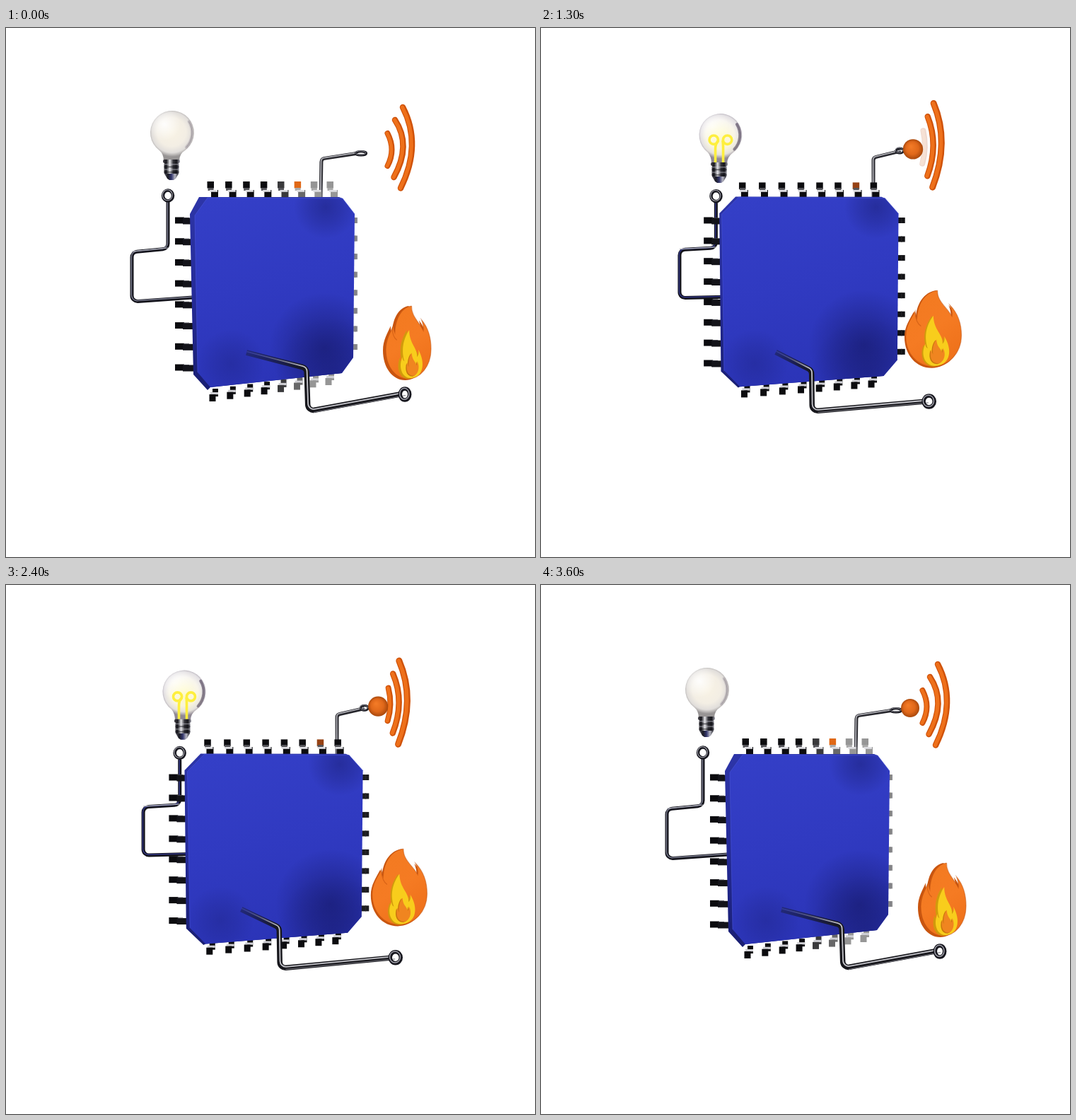
Animation, 748 px wide and 748 px high, one loop 3700 ms. Source, as an HTML page with a canvas:

```html
<!DOCTYPE html>
<html lang="en">
<head>
<meta charset="utf-8">
<title>Connected chip</title>
<style>
  html, body { margin: 0; width: 100%; height: 100%; overflow: hidden; background: #fff; }
  canvas { display: block; width: 748px; height: 748px; }
</style>
</head>
<body>
<canvas id="stage" width="748" height="748"></canvas>
<script>
const ctx = document.getElementById('stage').getContext('2d');
const LOOP = 3700, STEP = 100, HALF = 1800, MID = 0.5, FAR = 0.933;
const clamp = v => Math.max(0, Math.min(1, v));
const mix = (a, b, k) => a + (b - a) * k;
const rgb = (a, b, k) => `rgb(${a.map((v, i) => Math.round(mix(v, b[i], k))).join()})`;

let time = 0, turn = 0, w0 = 1, w1 = 0, w2 = 0;

// Weights for a smooth blend of three poses: start, middle, far turn.
function setTime(ms) {
  time = ms;
  turn = (1 - Math.cos(Math.PI * ms / HALF)) / 2;
  w0 = (turn - MID) * (turn - FAR) / (MID * FAR);
  w1 = turn * (turn - FAR) / (MID * (MID - FAR));
  w2 = turn * (turn - MID) / (FAR * (FAR - MID));
}
const q = (a, b, c) => a * w0 + b * w1 + c * w2;
const at = v => [q(v[0], v[2], v[4]), q(v[1], v[3], v[5])];

function poly(points) {
  ctx.beginPath();
  points.forEach(p => ctx.lineTo(p[0], p[1]));
  ctx.closePath();
}

function fade(x0, y0, x1, y1, ...colors) {
  const g = ctx.createLinearGradient(x0, y0, x1, y1);
  colors.forEach((c, i) => g.addColorStop(i / (colors.length - 1), c));
  return g;
}

function glow(x, y, r, ...colors) {
  const g = ctx.createRadialGradient(x, y, 0, x, y, r);
  colors.forEach((c, i) => g.addColorStop(i / (colors.length - 1), c));
  return g;
}

function line(points, r, width, color, dx = 0, dy = 0) {
  ctx.beginPath();
  points.forEach(([x, y], i) => {
    const next = points[i + 1];
    if (i && next) ctx.arcTo(x + dx, y + dy, next[0] + dx, next[1] + dy, r);
    else ctx.lineTo(x + dx, y + dy);
  });
  ctx.lineWidth = width;
  ctx.strokeStyle = color;
  ctx.stroke();
}

function ring(x, y, rx, ry, width) {
  const draw = (lw, color, d) => {
    ctx.beginPath();
    ctx.ellipse(x + d, y + d, rx, ry, 0, 0, 7);
    ctx.lineWidth = lw;
    ctx.strokeStyle = color;
    ctx.stroke();
  };
  draw(width, '#17171e', 0);
  draw(width * 0.25, '#a3a3ad', -0.7);
}

function lampWire() {
  const pts = [
    [229, 245, 240, 246, 250, 247], [229, 312, 240, 311, 250, 311],
    [178, 317, 188, 315, 199, 313], [178, 387, 188, 384, 199, 381],
    [264, 381, 260, 381, 259, 380]
  ].map(at);
  line(pts, 8, 5, '#13131b');
  line(pts, 8, 1.5, rgb([120, 122, 140], [48, 52, 130], clamp(turn * 2)), -0.6, -0.8);
  line(pts.slice(1, 3), 8, 1.2, '#b5b6c0', 0, -1);
  ring(q(229, 239.5, 250.5), q(237, 237, 238), 7, 7.5, 4.5);
}

function signalWire() {
  const pts = [
    [445, 244, 461, 244, 473, 242], [446, 185, 461, 184, 473, 183],
    [495, 177.5, 501, 176, 512, 173]
  ].map(at);
  line(pts, 5, 5, fade(0, 178, 0, 240, '#24242a', '#303036', '#55555c'));
  line(pts, 5, 1.8, '#aaaab0', -0.4, -0.8);
  ring(q(502, 505, 508), q(177.3, 175, 173), q(7.5, 6, 5), q(2.6, 3.2, 3.5), 3.2);
}

const spread = (a, b, i) => { const k = i / 7; return mix(a, b, k + 0.07 * k * (1 - k)); };

function pins() {
  const pale = i => clamp((i - 3) / 3) * clamp(1 - turn / 0.42);
  const tone = i => rgb([12, 12, 15], [150, 150, 150], pale(i));
  const box = (x, y, w, h, color) => { ctx.fillStyle = color; ctx.fillRect(x, y, w, h); };

  for (let i = 0; i < 8; i++) {
    const grey = rgb([10, 10, 13], [125, 125, 128], clamp(1 - turn));

    const lx = q(239, 232, 230), ly = mix(272, q(480, 476.5, 473), i / 7);
    box(lx, ly - 4.5, 13, 9, '#0b0b0f');
    box(lx + 11, ly - 3.5, 18, 9, '#131319');
    box(lx + 12, ly - 4, 8, 1, '#3a3a42');

    const rx = q(490, 498, 504), ry = mix(272, q(451, 455.5, 458.5), i / 7);
    box(rx, ry - 4, q(7, 10, 13), 8, rgb([10, 10, 13], [140, 140, 142], clamp(1 - turn * 1.15)));
    box(rx + q(3, 5, 7), ry - 4, 1.5, 8, grey);

    const tx = spread(q(289, 286, 284), q(458, 465, 472), i);
    let top = tone(i);
    if (i === 5 && turn < 0.3) top = rgb([224, 104, 22], [110, 90, 84], clamp(turn * 5));
    if (i === 6) top = rgb([150, 150, 150], [150, 66, 20], clamp(turn * 2.4));
    box(tx - 4.5, q(217, 218, 218.5), 9.5, 9.5, top);
    box(tx - 3.5, 226, 8, 4, pale(i) > 0.4 ? '#aaa' : '#55555a');
    const fx = tx + q(1, -0.5, -2);
    box(fx, 229, 10, 10, tone(i));
    box(fx - 2, 229, 11, 2.8, '#dedee2');

    const bx = spread(q(292, 289, 287), q(456, 462, 469), i);
    const by = mix(q(523, 519, 517), q(500, 502, 504), i / 7);
    box(bx, by - 13, 8, 11, tone(i));
    box(bx - 3, by - 8, 11, 3.2, '#cfcfd4');
    box(bx - 4.5, by - 5, 9, 10, tone(i));
  }
}

function shade(x, y, r, alpha) {
  ctx.fillStyle = glow(x, y, r, `rgba(18,20,92,${alpha})`, `rgba(18,20,92,${alpha * 0.55})`, 'rgba(18,20,92,0)');
  ctx.fillRect(x - r, y - r, 2 * r, 2 * r);
}

function chip() {
  const face = [
    [285, 240, 283, 239.5, 278, 239], [476, 241, 482, 241, 488, 240.5],
    [493, 263, 501, 262, 507, 263], [491, 466, 499, 468, 505.5, 470],
    [475, 488, 479, 491, 487, 492], [289, 508, 285, 508, 280, 507],
    [271, 487, 264, 486, 257, 484], [267, 265, 260, 264, 254, 263]
  ].map(at);
  const side = [
    [273, 239, 275, 238.5, 275, 238.5], [260, 263, 254, 262, 252, 262],
    [265, 490, 257, 487, 254, 485], [285, 512, 281, 510, 278, 508]
  ].map(at);
  poly([side[0], side[1], side[2], side[3], face[5], face[4], face[1], [face[1][0] - 5, face[1][1] - 2]]);
  ctx.fillStyle = fade(0, 240, 0, 510, '#2d35a8', '#252b98', '#191e72');
  ctx.fill();

  poly(face);
  ctx.fillStyle = fade(300, 235, 370, 510, '#343fc7', '#303ac1', '#2b34b7');
  ctx.fill();
  ctx.save();
  ctx.clip();
  shade(q(450, 462, 452), q(452, 458, 442), 78, 0.5);
  shade(q(452, 466, 476), 253, 45, 0.38);
  shade(q(318, 308, 300), 474, 48, 0.24);
  shade(q(460, 462, 462), 490, 80, 0.3);
  ctx.restore();
  ctx.lineWidth = 1;
  ctx.strokeStyle = 'rgba(75,88,218,.55)';
  ctx.beginPath();
  [face[6], face[7], face[0], face[1], face[2]].forEach(p => ctx.lineTo(...p));
  ctx.stroke();
}

function fireWire() {
  const pts = [
    [340, 459, 335, 459, 331, 458], [425, 481, 399, 484, 377, 484],
    [427, 542, 401, 542, 377, 542], [557, 518, 549, 524, 536, 530]
  ].map(at);
  const [a, b] = pts;
  line(pts, 8, 7.5, fade(a[0], a[1], b[0], b[1], '#222979', '#1b1f55', '#17171c'));
  line(pts, 8, 1.8, fade(a[0], a[1], b[0], b[1], 'rgba(70,80,190,.4)', '#5d5f7a', '#c4c4ca'), 0.4, -1.4);
  line(pts.slice(2), 8, 1, '#76767e', 8, 1.5);
  ring(q(564, 557, 545), q(518, 523, 530), q(6.7, 7.2, 7.8), 8, 5.5);
}

// Unit-box flame outlines: start point, then cubic segments.
const FLAME = [.57, 0, .56, .14, .74, .22, .83, .34, .84, .29, .82, .24, .79, .19, .94, .3, 1, .44, 1, .59,
  1, .83, .76, 1, .49, 1, .21, 1, 0, .83, 0, .6, 0, .46, .1, .37, .17, .27, .17, .31, .18, .34, .2, .37,
  .21, .18, .34, .02, .57, 0];
const CORE = [.48, .33, .48, .52, .66, .58, .64, .7, .68, .68, .68, .63, .67, .6, .82, .78, .78, .97, .53, .99,
  .32, 1, .25, .83, .34, .7, .34, .73, .35, .75, .38, .76, .3, .58, .38, .43, .48, .33];
const SPARK = [.54, .64, .54, .73, .61, .75, .64, .81, .65, .79, .65, .77, .65, .75, .72, .83, .67, .94, .57, .95,
  .45, .95, .41, .86, .45, .77, .46, .79, .46, .81, .48, .83, .46, .75, .49, .68, .54, .64];

function flame(shape, x, y, w, h, color) {
  const X = i => x + shape[i] * w, Y = i => y + shape[i] * h;
  ctx.beginPath();
  ctx.moveTo(X(0), Y(1));
  for (let i = 2; i < shape.length; i += 6) {
    ctx.bezierCurveTo(X(i), Y(i + 1), X(i + 2), Y(i + 3), X(i + 4), Y(i + 5));
  }
  ctx.fillStyle = color;
  ctx.fill();
}

function fire() {
  const x = q(533, 522, 511), y = q(393, 380, 368);
  const w = q(68, 76, 82), h = q(105, 108, 110), d = q(4, 2.5, 1.5);
  flame(FLAME, x, y, w - d, h, '#c9550f');
  flame(FLAME, x + d, y, w - d, h - 2, fade(x, y, x + w, y + h, '#f27a20', '#f57b23', '#ec6d17'));
  ctx.lineWidth = 1.2;
  ctx.strokeStyle = 'rgba(190,78,12,.5)';
  ctx.stroke();
  ctx.beginPath();
  ctx.moveTo(x + w * .19, y + h * .29);
  ctx.quadraticCurveTo(x + w * .2, y + h * .42, x + w * .29, y + h * .46);
  ctx.stroke();
  const ix = x + q(3.5, 2, 1);
  flame(CORE, ix - d * .6, y, w, h - 1, '#d19a0c');
  flame(CORE, ix + 1, y, w, h - 2, '#f8cd1c');
  flame(SPARK, ix - .8, y, w, h, '#c9760d');
  flame(SPARK, ix + .6, y, w, h - 1, '#f08520');
}

function bulb() {
  const x = q(235, 245.7, 257), y = q(148, 150, 152), r = q(31, 31, 30);
  const top = q(186, 188.5, 190.5), bx = q(234, 243.5, 255.5);
  const lit = clamp((turn - 0.03) / 0.36);

  // Glass with a short neck.
  const a = 1.02;
  ctx.beginPath();
  ctx.arc(x, y, r, Math.PI / 2 + a * .62, Math.PI / 2 - a * .62);
  ctx.quadraticCurveTo(bx + 11, top - 8, bx + 11, top + 2);
  ctx.lineTo(bx - 11, top + 2);
  ctx.quadraticCurveTo(bx - 11, top - 8, x - r * Math.sin(a * .62), y + r * Math.cos(a * .62));
  ctx.closePath();
  const g = ctx.createRadialGradient(x - 2, y - 2, 0, x, y, r + 3);
  g.addColorStop(0, rgb([249, 243, 228], [255, 254, 242], lit));
  g.addColorStop(.6, rgb([243, 238, 228], [248, 245, 240], lit));
  g.addColorStop(.84, rgb([225, 222, 219], [227, 224, 227], lit));
  g.addColorStop(1, rgb([151, 148, 148], [143, 136, 149], lit));
  ctx.fillStyle = g;
  ctx.fill();
  ctx.save();
  ctx.clip();
  ctx.fillStyle = glow(x - 11, y - 12, 23, 'rgba(255,255,255,.9)', 'rgba(255,255,255,0)');
  ctx.fillRect(x - r, y - r, 2 * r, 2 * r);
  ctx.lineCap = 'round';
  ctx.lineWidth = 4;
  ctx.strokeStyle = `rgba(66,52,80,${0.18 + lit * .4})`;
  ctx.beginPath();
  ctx.arc(x - 2, y, r - 1, -.55, .75);
  ctx.stroke();
  ctx.restore();
  ctx.lineWidth = .8;
  ctx.strokeStyle = 'rgba(112,105,112,.6)';
  ctx.stroke();

  if (lit > 0) {
    const gap = q(6, 8.5, 10), cy = y + q(7, 7, 6.5), loop = q(5, 5.5, 6.5);
    ctx.save();
    ctx.globalAlpha = mix(.3, 1, lit) * clamp(lit * 5);
    ctx.fillStyle = glow(x, cy, 29, 'rgba(255,244,110,.35)', 'rgba(255,246,160,0)');
    ctx.fillRect(x - 29, cy - 29, 58, 58);
    ctx.strokeStyle = rgb([250, 196, 132], [254, 239, 62], clamp(lit * 1.2 - .15));
    ctx.lineWidth = 3.6;
    for (const s of [-1, 1]) {
      const cx = x + s * gap, foot = bx + s * 5.5;
      ctx.beginPath();
      ctx.arc(cx, cy, loop, 0, 7);
      ctx.stroke();
      ctx.beginPath();
      ctx.moveTo(foot, top);
      ctx.lineTo(foot, cy + 13);
      ctx.quadraticCurveTo(foot, cy + 5, x + s * 3, cy + 1);
      ctx.stroke();
    }
    ctx.restore();
  }
  ctx.lineCap = 'butt';

  // Screw base.
  const metal = fade(bx - 12, 0, bx + 12, 0, '#45434a', '#17171c', '#e5e5e8', '#35353b', '#141419', '#a5a5b0');
  ctx.fillStyle = metal;
  ctx.beginPath();
  ctx.roundRect(bx - 12, top, 24, 5, 2);
  ctx.roundRect(bx - 10.5, top + 4, 21, 17, 3);
  ctx.fill();
  for (let i = 0; i < 4; i++) {
    ctx.fillStyle = i % 2 ? 'rgba(12,12,20,.6)' : 'rgba(220,220,230,.45)';
    ctx.fillRect(bx - 10.5, top + 6 + i * 3.7, 21, 1.4);
  }
  poly([[bx - 10, top + 20], [bx + 10, top + 20], [bx + 6, top + 27], [bx + 3, top + 29], [bx - 3, top + 29], [bx - 6, top + 27]]);
  ctx.fillStyle = fade(bx - 10, 0, bx + 10, 0, '#555560', '#1a1a22', '#33366c', '#b9b9c4', '#22222a');
  ctx.fill();
}

// Each part of the signal turns white around its own moment.
const shown = moment => clamp((Math.abs(time - moment) - 50) / 250);

function wave(moment, start, mid, end, width) {
  const k = shown(moment), [x0, y0] = at(start), [mx, my] = at(mid), [x1, y1] = at(end);
  const stroke = (color, w, dx) => {
    ctx.beginPath();
    ctx.moveTo(x0 + dx, y0);
    ctx.quadraticCurveTo(2 * mx - (x0 + x1) / 2 + dx, 2 * my - (y0 + y1) / 2, x1 + dx, y1);
    ctx.lineWidth = w;
    ctx.strokeStyle = color;
    ctx.stroke();
  };
  ctx.lineCap = 'round';
  stroke(rgb([245, 243, 245], [207, 82, 10], k), width, 0);
  stroke(rgb([248, 247, 248], [238, 112, 26], k), width * .6, -.6);
  ctx.lineCap = 'butt';
}

function signal() {
  wave(3050, [561, 112, 558, 109, 554, 105.5], [574, 167, 570.5, 165, 564.5, 163], [558, 226.5, 557, 225.5, 552, 225], q(8.5, 9, 9));
  wave(2070, [550, 130, 548.5, 126.5, 546, 125], [561.5, 168, 558.5, 167, 553, 166], [548.5, 211, 548, 210, 545.5, 209], 8.5);
  wave(1210, [539.5, 149, 541, 147, 540, 144.5], [545.5, 172, 545, 170, 541.7, 168], [539.5, 195, 540.5, 193.5, 538.5, 191], 8);

  const k = shown(0);
  if (!k) return;
  const x = q(522, 526, 525.5), y = q(174, 172.5, 171), r = q(13, 13.8, 14.3);
  ctx.globalAlpha = k;
  const g = ctx.createRadialGradient(x - 3, y - 4, 1, x, y, r);
  g.addColorStop(0, '#f27a26');
  g.addColorStop(.6, '#e0681a');
  g.addColorStop(1, '#a9480c');
  ctx.fillStyle = g;
  ctx.beginPath();
  ctx.arc(x, y, r, 0, 7);
  ctx.fill();
  ctx.globalAlpha = 1;
}

function frame(now) {
  setTime(Math.floor((now % LOOP) / STEP) * STEP);
  ctx.fillStyle = '#fff';
  ctx.fillRect(0, 0, 748, 748);
  lampWire();
  signalWire();
  pins();
  chip();
  fireWire();
  fire();
  bulb();
  signal();
}

const begin = performance.now();
function tick() {
  frame(performance.now() - begin);
  requestAnimationFrame(tick);
}
tick();
</script>
</body>
</html>
```
